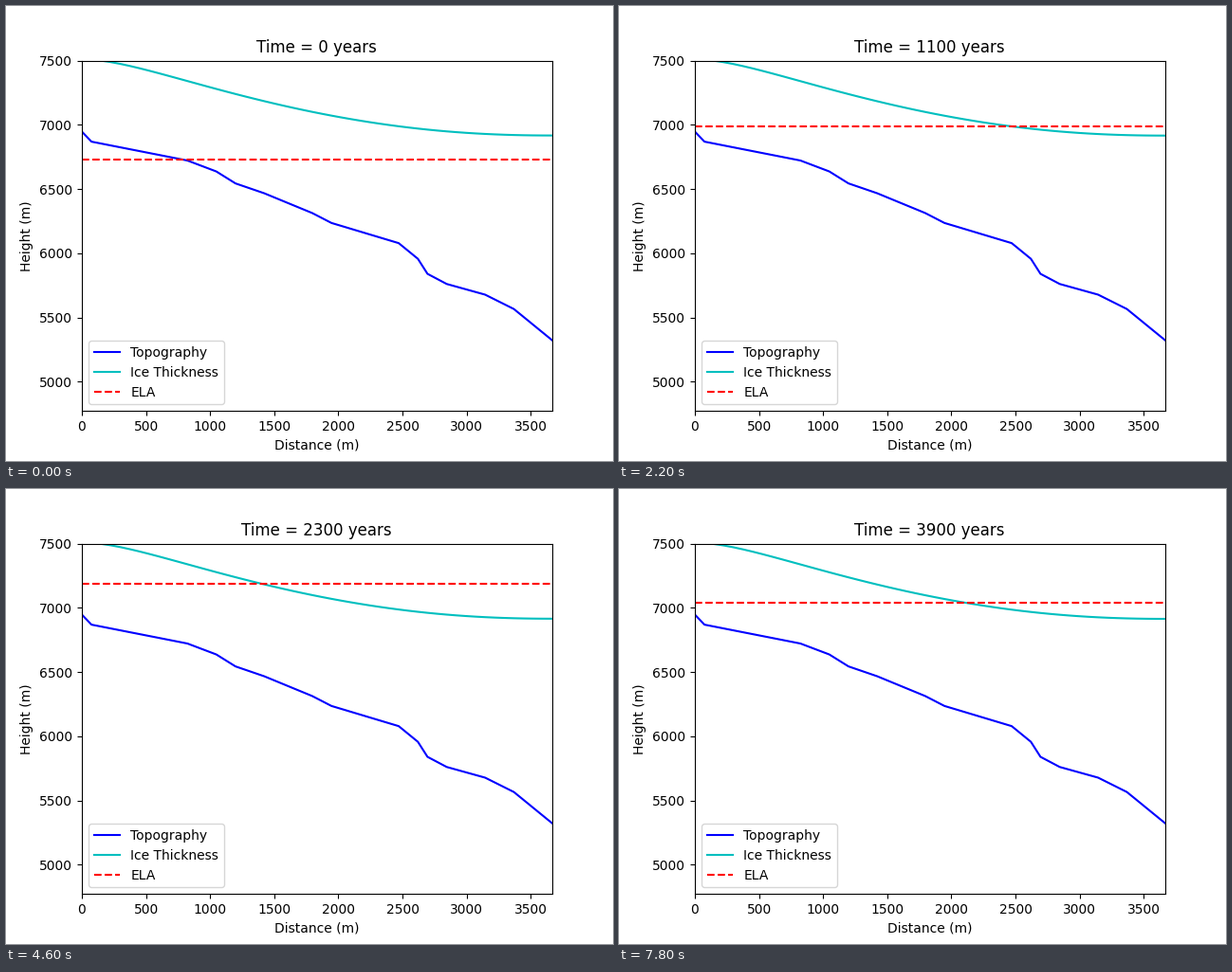
Recreate the animation shown at these times as a matplotlib script. Size 640 by 480 pixels, loop 8 s.

```python
import numpy as np
import matplotlib.pyplot as plt
from matplotlib.animation import FuncAnimation

LENGTH = 3668.5     # glacier length in m
CELLS = 49
STEP_YEARS = 100
FRAMES = 40

# Breaks of slope along the bed: (cell, height in m)
BED = [(0, 6947), (1, 6869), (11, 6722), (14, 6637), (16, 6544),
       (19, 6467), (24, 6313), (26, 6236), (33, 6079), (35, 5957),
       (36, 5840), (38, 5761), (42, 5678), (45, 5566), (49, 5322)]

# Turning points of the climate: (year, ELA in m)
ELA = [(0, 6729), (500, 6814), (1100, 6987), (1500, 7083),
       (2300, 7187), (3000, 7180), (3900, 7037)]


def smooth(points, x):
    """Cubic Hermite curve through (x, y) points."""
    px, py = np.array(points, float).T
    slope = np.gradient(py, px)
    i = np.clip(np.searchsorted(px, x, side="right") - 1, 0, len(px) - 2)
    h = px[i + 1] - px[i]
    t = (x - px[i]) / h
    return ((1 + 2 * t) * (1 - t) ** 2 * py[i]
            + t * (1 - t) ** 2 * h * slope[i]
            + t ** 2 * (3 - 2 * t) * py[i + 1]
            + t ** 2 * (t - 1) * h * slope[i + 1])


def ice_surface(u, year):
    """Ice height at the fraction u of the length; it sinks very slowly."""
    bulge = 1 + 0.215 * (1 - np.exp(-u / 0.11)) - 0.4 * u ** 4
    return 6917 + 594 * (1 - u) ** 2 * bulge - 3 * year / 4000


u = np.linspace(0, 1, CELLS + 1)
dist = u * LENGTH
bed = np.interp(np.arange(CELLS + 1), *zip(*BED))
years = np.arange(FRAMES) * STEP_YEARS
ela = smooth(ELA, years)

fig, ax = plt.subplots(figsize=(6.4, 4.8), dpi=100)
ax.plot(dist, bed, "b", label="Topography")
ice_line, = ax.plot(dist, ice_surface(u, 0), "c", label="Ice Thickness")
ela_line, = ax.plot(dist, np.full_like(dist, ela[0]), "r--", label="ELA")
ax.set_xlim(0, LENGTH)
ax.set_ylim(4772.5, 7500)
ax.set_xlabel("Distance (m)")
ax.set_ylabel("Height (m)", labelpad=4.4)
ax.legend(loc="lower left")
title = ax.set_title("Time = 0 years", x=0.499)


def update(i):
    ice_line.set_ydata(ice_surface(u, years[i]))
    ela_line.set_ydata(np.full_like(dist, ela[i]))
    title.set_text(f"Time = {years[i]} years")
    return ice_line, ela_line, title


anim = FuncAnimation(fig, update, frames=FRAMES, interval=200,
                     repeat=True, repeat_delay=0, blit=False)
plt.show()
```
